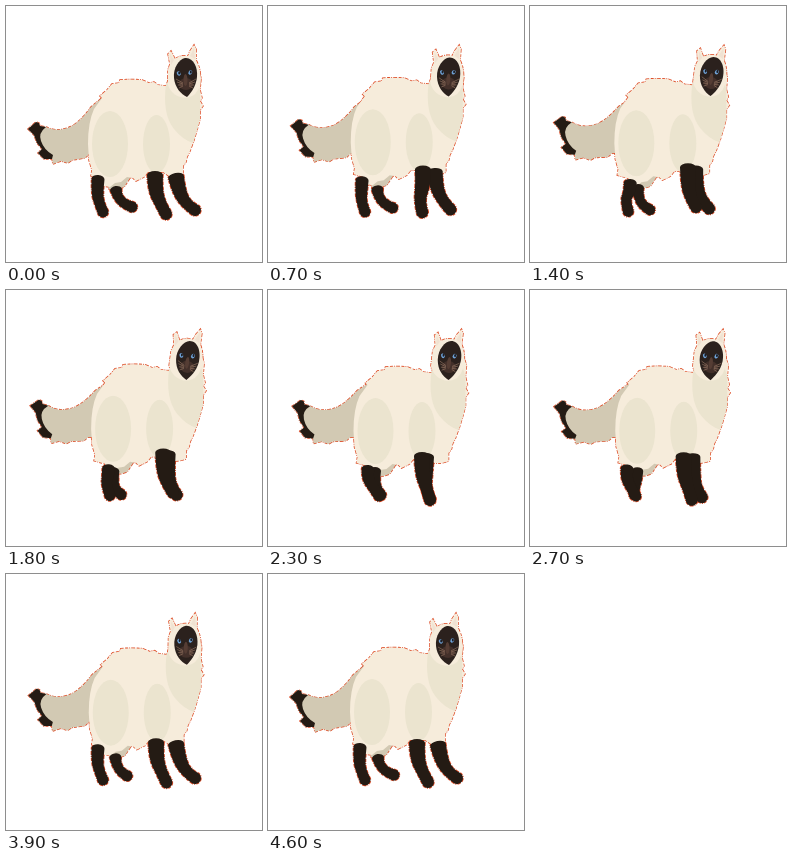
Animation, 256 px wide and 256 px high, one loop 4.7 s. Source, as an HTML page with a canvas:

```html
<!DOCTYPE html>
<html lang="en">
<head>
<meta charset="utf-8">
<title>Walking cat</title>
<style>
html, body { margin: 0; width: 100%; height: 100%; overflow: hidden; background: #fff; }
canvas { display: block; }
</style>
</head>
<body>
<canvas id="stage" width="256" height="256"></canvas>
<script>
const ctx = document.getElementById('stage').getContext('2d');
const LOOP = 4700, STRIDE = 4600, STEP = 100;
const CREAM = '#f6ecdb', SHADE = '#ebe4cf', TAIL = '#d2c9b3', DARK = '#241b14', EDGE = '#dd4c26';

const body = new Path2D(`M96 92 L94 90 L101 84 L106 78 L113 77 L114 74 Q125 73 136 74 L143 77 L148 76
  L152 79 L160 80 L163 72 L190 58 L195 72 L194 84 L196 92 L194 95 L197 100 L194 104 L194 113
  L191 124 L188 134 L184 145 L181 151 L180 156 L177 160 L177 168 Q170 171 163 170 L157 166 L142 166
  L138 171 L130 175 L127 172 L121 171 L115 176 L109 177 L104 181 L97 180 L96 173 L85 170
  L86 164 L83 154 L82 138 Q82 116 88 103 Z`);
const chest = new Path2D('M160 78 Q156 108 168 123 Q177 134 187 137 L191 124 L194 113 L194 84 L190 70 Z');
const thigh = new Path2D('M101 174 L126 169 L122 175 L118 181 L112 183 L103 183 Z');
const tail = new Path2D(`M22 123 L30 116 L33 117 L34 120 L40 121 Q52 127 66 120 Q76 114 85 101 L97 91 L94 146
  L83 148 L79 152 L66 154 L62 157 L55 155 L47 158 L46 153 L38 153 L32 147 L36 143 L31 137 L28 129 Z`);
const tailTip = new Path2D(`M22 123 L30 116 L33 117 L34 120 L40 121 Q32 127 35 135 Q38 144 47 149 L46 153
  L38 153 L32 147 L36 143 L31 137 L28 129 Z`);
const head = new Path2D(`M162 79 L162 64 L164 58 L162 48 L165 45 L169 53 Q174 49 182 50 L184 45
  L188 39 L190 43 L190 54 Q196 65 194 78 Q192 90 180 92 Q166 91 162 79 Z`);
const ears = new Path2D('M164 48 L168 54 L165 59 Z M188 42 L189 53 L184 50 Z');
const face = new Path2D('M179 52 C187 51 192 61 191 71 C190 81 184 88 181 91 C175 88 169 82 168 72 C167 62 173 53 179 52 Z');

// One stride: the front legs cross at mid-stride, then swing back.
function pose(t) {
  const w = 2 * Math.PI * Math.min(1, t / STRIDE);
  const bob = (1 - Math.cos(w)) / 2;
  const cross = bob ** 6;
  const pull = Math.max(0, Math.sin(w));
  const lift = pull * bob;
  const drop = Math.max(0, -Math.sin(w)) * bob;
  const kick = pull * Math.sin(2 * w);
  const rearHip = 91 + 8 * cross + 12 * lift;
  const foreHip = 149 + 5 * bob + 6 * pull;
  // Each leg: hip, knee, ankle, toe
  return {
    x: 3.5 * bob,
    y: 3 * bob - 3 * pull,
    turn: .9 * bob + .4 * pull,
    wag: .1 * bob + .03 * pull,
    rearFar: [
      [110 - 3 * bob, 184 - 3 * bob],
      [111 - 4 * bob, 190],
      [118 - 9 * cross - 17 * drop - 8 * lift, 198 + 2 * bob],
      [126 - 13 * cross - 28 * drop - 8 * lift, 201 + 4 * bob]
    ],
    rearNear: [
      [rearHip + 1, 173 + 6 * bob],
      [rearHip, 188],
      [94 + 12 * cross, 199 - 9 * lift],
      [97 + 14 * cross, 206 - lift]
    ],
    foreFar: [
      [170 - 12 * cross - 4 * pull, 171 - 4 * bob - 5 * pull],
      [173 - 15 * cross - 6 * pull, 186 - 3 * bob - 6 * pull],
      [181 - 23 * cross - 8 * pull, 199 - 5 * pull],
      [189 - 27 * cross - 8 * pull, 204 + 5 * cross - 3 * lift]
    ],
    foreNear: [
      [foreHip, 169 - 3 * bob - 6 * pull],
      [foreHip, 184 - 5 * pull],
      [155 + 4 * bob - 6 * kick, 199 + bob - 6 * pull],
      [160 + 2 * bob - 8 * kick, 208 + 2 * bob - 13 * lift]
    ]
  };
}

// Tapered limb with a rounded hip and paw
function legPath(joints, widths) {
  const left = [], right = [];
  joints.forEach(([x, y], i) => {
    const a = joints[Math.max(0, i - 1)], b = joints[Math.min(3, i + 1)];
    const angle = Math.atan2(b[1] - a[1], b[0] - a[0]);
    const nx = Math.sin(angle) * widths[i], ny = -Math.cos(angle) * widths[i];
    left.push([x + nx, y + ny]);
    right.unshift([x - nx, y - ny]);
  });
  const path = new Path2D();
  const side = s => {
    path.quadraticCurveTo(...s[1], (s[1][0] + s[2][0]) / 2, (s[1][1] + s[2][1]) / 2);
    path.quadraticCurveTo(...s[2], ...s[3]);
  };
  const cap = (edge, [x, y], rx, ry) => {
    const angle = Math.atan2(edge[1] - y, edge[0] - x);
    path.ellipse(x, y, rx, ry, angle, 0, Math.PI);
  };
  path.moveTo(...left[0]);
  side(left);
  cap(left[3], joints[3], widths[3], widths[3]);
  side(right);
  cap(right[3], joints[0], widths[0], 4);
  path.closePath();
  return path;
}

function fill(path, color) {
  ctx.fillStyle = color;
  ctx.fill(path);
}

function oval(x, y, rx, ry, color, angle = 0) {
  ctx.beginPath();
  ctx.ellipse(x, y, rx, ry, angle, 0, 7);
  ctx.fillStyle = color;
  ctx.fill();
}

function placed(x, y, angle, px, py, paint) {
  ctx.save();
  ctx.translate(px + x, py + y);
  ctx.rotate(angle);
  ctx.translate(-px, -py);
  paint();
  ctx.restore();
}

function drawFace() {
  fill(ears, '#f0e2d2');
  fill(face, '#2b211d');
  oval(180, 78, 7, 6, '#43302a');
  oval(179.5, 74, 2, 6, '#553d34');
  for (const s of [-1, 1]) {
    const x = 178.5 + s * 5.8, y = 67 - s * .5;
    oval(x, y, 1.8, 2.4, '#6fa3d8', s * .5);
    oval(x + .5, y - .6, 1, 1.5, '#1b1d24');
  }
  ctx.strokeStyle = '#9a7a66';
  ctx.lineWidth = .6;
  ctx.beginPath();
  for (const s of [-1, 1])
    for (let i = 0; i < 4; i++) {
      ctx.moveTo(180 + s * 3, 77 + i);
      ctx.lineTo(180 + s * (10 - i), 73 + i * 3);
    }
  ctx.stroke();
}

function draw(t) {
  const p = pose(t);
  const legs = [
    legPath(p.rearFar, [6, 5, 5, 5.5]),
    legPath(p.rearNear, [6.5, 6, 5, 5.5]),
    legPath(p.foreFar, [8, 7, 5.5, 6]),
    legPath(p.foreNear, [8, 7.5, 5.5, 6])
  ];
  const onTail = paint => placed(p.x / 3, 0, p.wag, 90, 130, paint);
  const onBody = paint => placed(p.x, p.y, 0, 0, 0, paint);
  const onHead = paint => placed(p.turn * 2, -p.turn, p.turn * .13, 180, 71, paint);

  ctx.fillStyle = '#fff';
  ctx.fillRect(0, 0, 256, 256);

  // Broken red rim, left visible only outside the fills
  ctx.strokeStyle = EDGE;
  ctx.lineWidth = 1.5;
  ctx.setLineDash([3, 1, 1, 1, 4, 1.5]);
  onTail(() => ctx.stroke(tail));
  onBody(() => { ctx.stroke(thigh); ctx.stroke(body); });
  onHead(() => ctx.stroke(head));
  legs.forEach(leg => ctx.stroke(leg));
  ctx.setLineDash([]);

  onTail(() => { fill(tail, TAIL); fill(tailTip, DARK); });
  onBody(() => {
    fill(thigh, TAIL);
    fill(body, CREAM);
    fill(chest, SHADE);
    oval(104, 138, 18, 33, SHADE);
    oval(150.5, 138, 13.5, 29, SHADE);
  });
  onHead(() => { fill(head, CREAM); drawFace(); });
  legs.forEach(leg => fill(leg, DARK));
}

const start = performance.now();
function tick() {
  const t = (performance.now() - start) % LOOP;
  draw(Math.floor(t / STEP) * STEP);
  requestAnimationFrame(tick);
}
tick();
</script>
</body>
</html>
```
